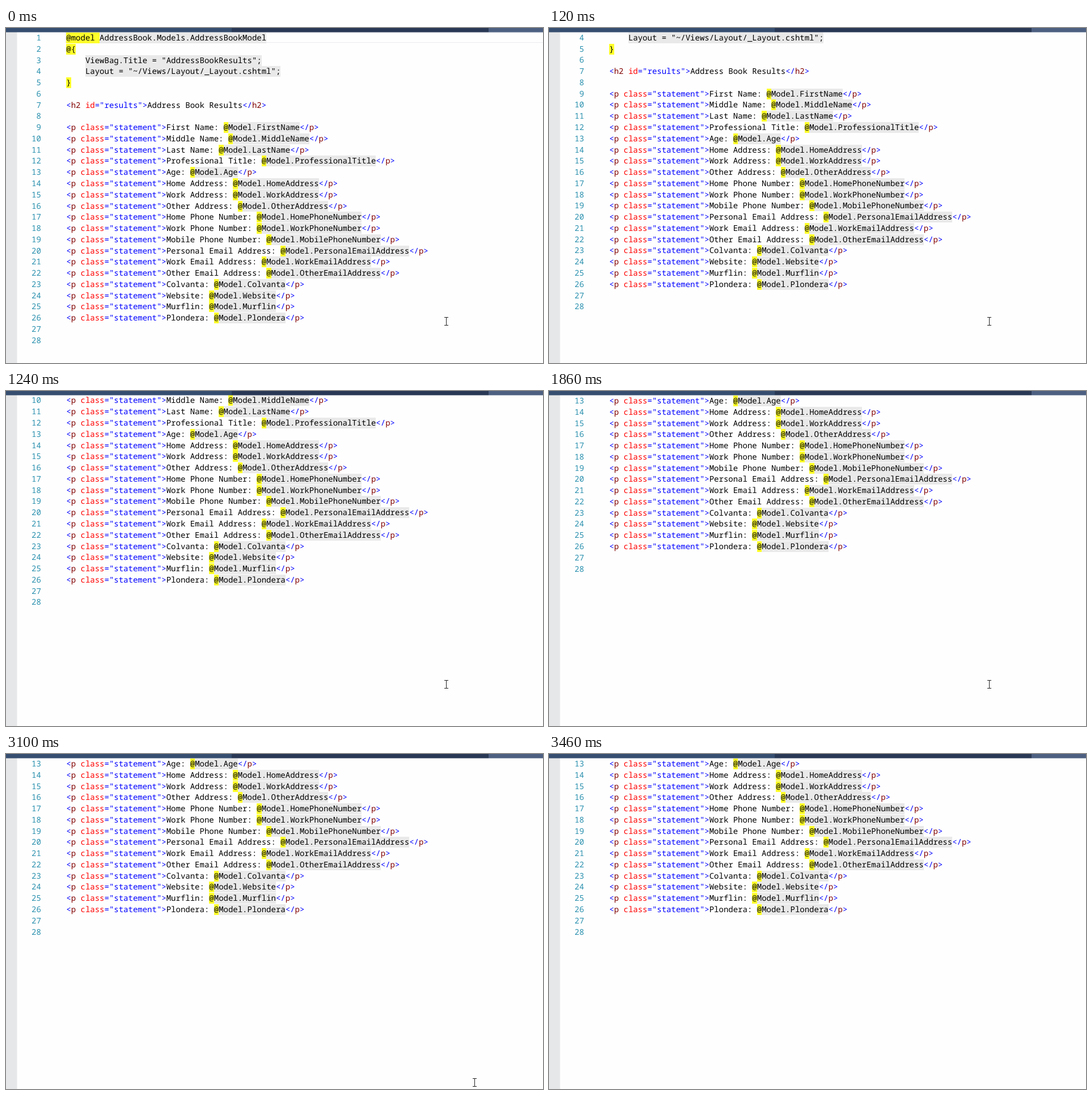
An HTML page for the animation above (5.6 s loop, 947 by 591 pixels).

```html
<!DOCTYPE html>
<html lang="en">
<head>
<meta charset="utf-8">
<title>Code editor scroll</title>
<style>
  html, body { margin: 0; width: 100%; height: 100%; overflow: hidden; background: #fefefe; }
  svg { display: block; }
  text {
    font: 14px "Noto Sans Mono", "DejaVu Sans Mono", monospace;
    white-space: pre;
    text-rendering: geometricPrecision;
  }
  .num { fill: #2b91af; text-anchor: end; }
  .mark { fill: #f00; }
  .tag { fill: #800000; }
  .blue { fill: #00f; }
  .hot { fill: #ffff2a; }
  .code { fill: #e9e9e9; }
</style>
</head>
<body>
<svg width="947" height="591" viewBox="0 0 947 591">
  <rect width="947" height="591" fill="#fefefe"/>
  <rect y="7" width="19.5" height="584" fill="#e6e7e8"/>
  <rect id="current" x="105" y="8.5" width="850" height="17" fill="none" stroke="#eaeaf0"/>
  <g id="rows"></g>
  <rect width="398" height="7.5" fill="#364e6f"/>
  <rect x="398" width="453" height="7.5" fill="#293955"/>
  <rect x="851" width="96" height="7.5" fill="#4d6082"/>
  <path id="cursor" d="M0 .5H7M3.5 1V14M0 14.5H7" fill="none" stroke="#222"/>
</svg>
<script>
const LOOP = 5600, LEFT = 106.3, ADVANCE = 8.4, PITCH = 19.77;

const fields = [
  "First Name", "Middle Name", "Last Name", "Professional Title", "Age",
  "Home Address", "Work Address", "Other Address",
  "Home Phone Number", "Work Phone Number", "Mobile Phone Number",
  "Personal Email Address", "Work Email Address", "Other Email Address",
  "Colvanta", "Website", "Murflin", "Plondera"
];

// A token is [text, text class, background class].
const openTag = (name, attr, value) => [
  ["<", "blue"], [name, "tag"], [" " + attr, "mark"], [`="${value}">`, "blue"]
];
const closeTag = name => [["</", "blue"], [name, "tag"], [">", "blue"]];
const fieldLine = label => [
  ...openTag("p", "class", "statement"),
  [label + ": "], ["@", "", "hot"], ["Model." + label.replace(/ /g, ""), "", "code"],
  ...closeTag("p")
];

const lines = [
  [["@model ", "", "hot"], ["AddressBook.Models.AddressBookModel", "", "code"]],
  [["@{", "", "hot"]],
  [["    "], ['ViewBag.Title = "AddressBookResults";', "", "code"]],
  [["    "], ['Layout = "~/Views/Layout/_Layout.cshtml";', "", "code"]],
  [["}", "", "hot"]],
  [],
  [...openTag("h2", "id", "results"), ["Address Book Results"], ...closeTag("h2")],
  [],
  ...fields.map(fieldLine),
  [],
  []
];

// Each view: start time, first visible line, vertical centre of the top row.
const views = [
  [0, 0, 17.5], [120, 3, 17.36], [740, 6, 17.2], [1240, 9, 16.995], [1860, 12, 17.5]
];
// Cursor steps: start time, left, top.
const steps = [
  [0, 773, 510], [2860, 788, 528], [2980, 806, 554],
  [3100, 823, 572], [3220, 854, 576], [3340, 880, 566]
];
const CURSOR_END = 3460;

const byId = id => document.getElementById(id);
const current = byId("current"), cursor = byId("cursor");

function add(parent, tag, attrs, text = "") {
  const node = document.createElementNS("http://www.w3.org/2000/svg", tag);
  for (const key in attrs) node.setAttribute(key, attrs[key]);
  node.textContent = text;
  return parent.appendChild(node);
}

const rows = lines.map((tokens, index) => {
  const row = add(byId("rows"), "g", {});
  let column = 0;
  for (const [text, , back] of tokens) {
    const x = Math.round(LEFT + column * ADVANCE);
    column += text.length;
    const end = Math.round(LEFT + column * ADVANCE);
    if (back) add(row, "rect", { x, y: -9, width: end - x, height: 19, class: back });
  }
  add(row, "text", { x: 61.8, y: 5, class: "num" }, index + 1);
  const line = add(row, "text", { x: LEFT, y: 5 });
  for (const [text, color] of tokens) add(line, "tspan", { class: color || "" }, text);
  return row;
});

const latest = (list, t) => list.filter(item => item[0] <= t).pop();
const show = (node, on) => node.setAttribute("visibility", on ? "visible" : "hidden");
const move = (node, x, y) => node.setAttribute("transform", `translate(${x} ${y})`);

function draw(t) {
  const [, first, top] = latest(views, t);
  rows.forEach((row, i) => {
    show(row, i >= first);
    move(row, 0, Math.floor(top + (i - first) * PITCH));
  });
  show(current, first === 0);
  const [, x, y] = latest(steps, t);
  move(cursor, x, y);
  show(cursor, t < CURSOR_END);
}

const start = performance.now();
function tick() {
  draw((performance.now() - start) % LOOP);
  requestAnimationFrame(tick);
}
tick();
</script>
</body>
</html>
```
